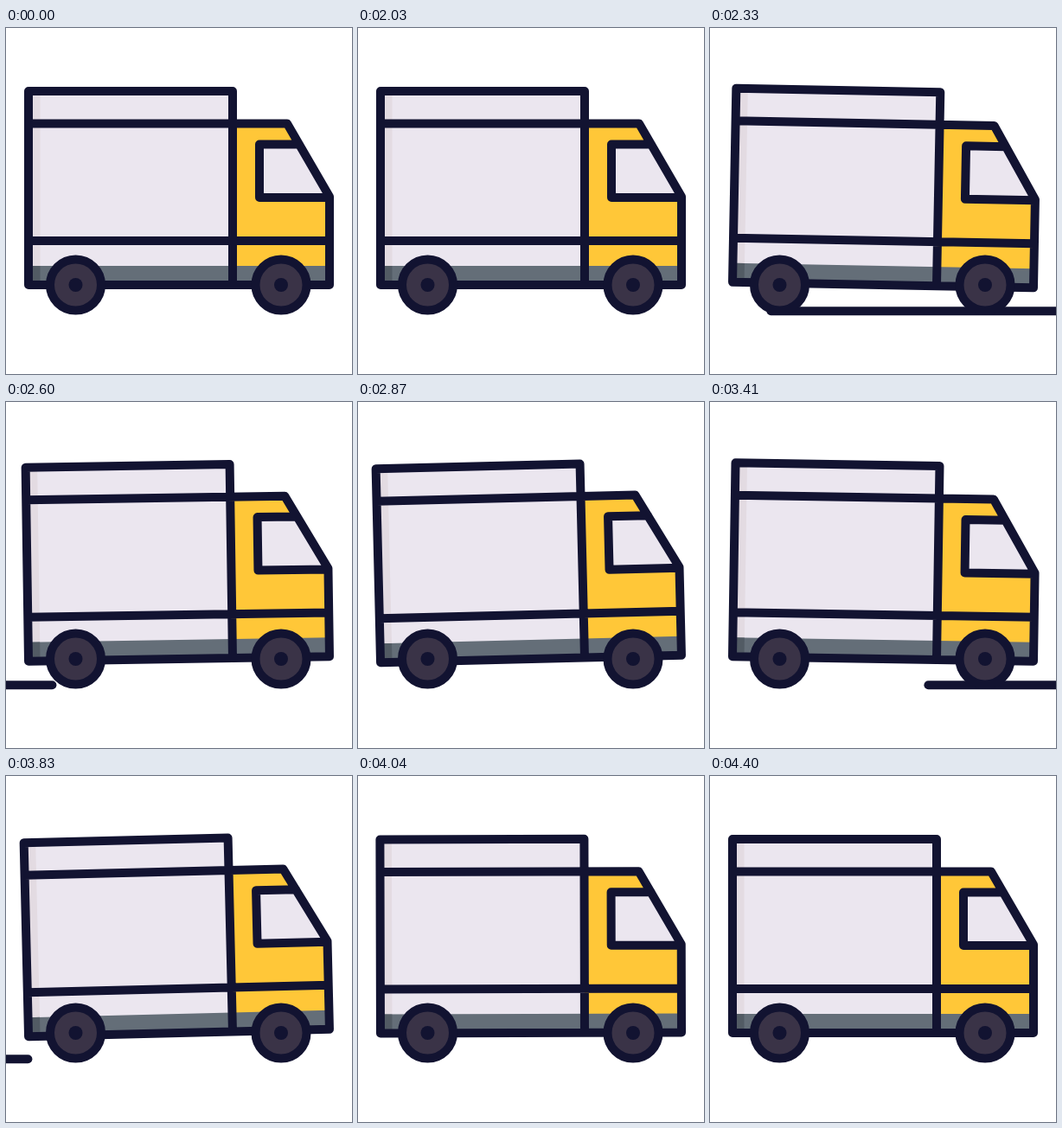
Animation, 400 px wide and 400 px high, one loop 4.43 s. Source, as an HTML page:

```html
<!DOCTYPE html>
<html lang="en">
<head>
<meta charset="utf-8">
<title>Delivery truck</title>
<style>
  html, body { margin: 0; height: 100%; overflow: hidden; background: #fff; }
  svg { display: block; width: 100vw; height: 100vh; }
  .ink { fill: none; stroke: #121331; stroke-width: 10; stroke-linecap: round; stroke-linejoin: round; }
  .tire { fill: #3a3347; stroke: #121331; stroke-width: 10; }
</style>
</head>
<body>
<svg viewBox="0 0 400 400">
  <g id="body">
    <path fill="#ebe6ef" d="M26 73H262V297H26z"/>
    <path fill="#e3dbe2" d="M26 73H39.500V275H26z"/>
    <path fill="#ffc738" d="M262 110.500H325L374 195V297H262z"/>
    <path fill="#646e78" d="M26 275H374V297H26z"/>
    <path fill="#525b64" d="M26 275H39.500V297H26z"/>
    <path fill="#ebe6ef" d="M293 134.500H339L374 196H293z"/>
    <path class="ink" d="M26 73H262V297H26zM26 110.500H325L374 195V297H262M26 246H374M339 134.500H293V196H374"/>
  </g>
  <path id="streaks" class="ink"/>
  <g id="wheels">
    <circle class="tire" cx="80.500" cy="297" r="29.500"/>
    <circle cx="80.500" cy="297" r="8" fill="#121331"/>
    <circle class="tire" cx="318" cy="297" r="29.500"/>
    <circle cx="318" cy="297" r="8" fill="#121331"/>
  </g>
</svg>
<script>
const LOOP = 4430;
const SPEED = 1.4, LENGTH = 361;
const STREAK_STARTS = [2086, 3296];
// [time in ms, tilt in degrees]
const TILT = [[2030, 0], [2320, 1.1], [2790, -1.4], [3260, 1.1], [3730, -1.4], [4200, 0]];

const body = document.getElementById('body');
const streaks = document.getElementById('streaks');

const ease = u => u < 0.5 ? 8 * u ** 4 : 1 - 8 * (1 - u) ** 4;

function tiltAt(t) {
  const next = TILT.findIndex(([time]) => t < time);
  if (next < 1) return 0;
  const [t0, a] = TILT[next - 1], [t1, b] = TILT[next];
  return a + (b - a) * ease((t - t0) / (t1 - t0));
}

function streakAt(t, start) {
  const x = 412 - SPEED * (t - start);
  return x > 410 || x + LENGTH < -10 ? '' : `M${x} 327.300h${LENGTH}`;
}

function draw(now) {
  // Motion advances in 30 ms steps after the opening hold
  const raw = now % LOOP;
  const t = raw < 2030 ? 0 : 2030 + Math.floor((raw - 2030) / 30) * 30;
  body.setAttribute('transform', `rotate(${tiltAt(t)} 200 297)`);
  streaks.setAttribute('d', STREAK_STARTS.map(s => streakAt(t, s)).join(''));
}

const begin = performance.now();
function tick() {
  draw(performance.now() - begin);
  requestAnimationFrame(tick);
}
tick();
</script>
</body>
</html>
```
